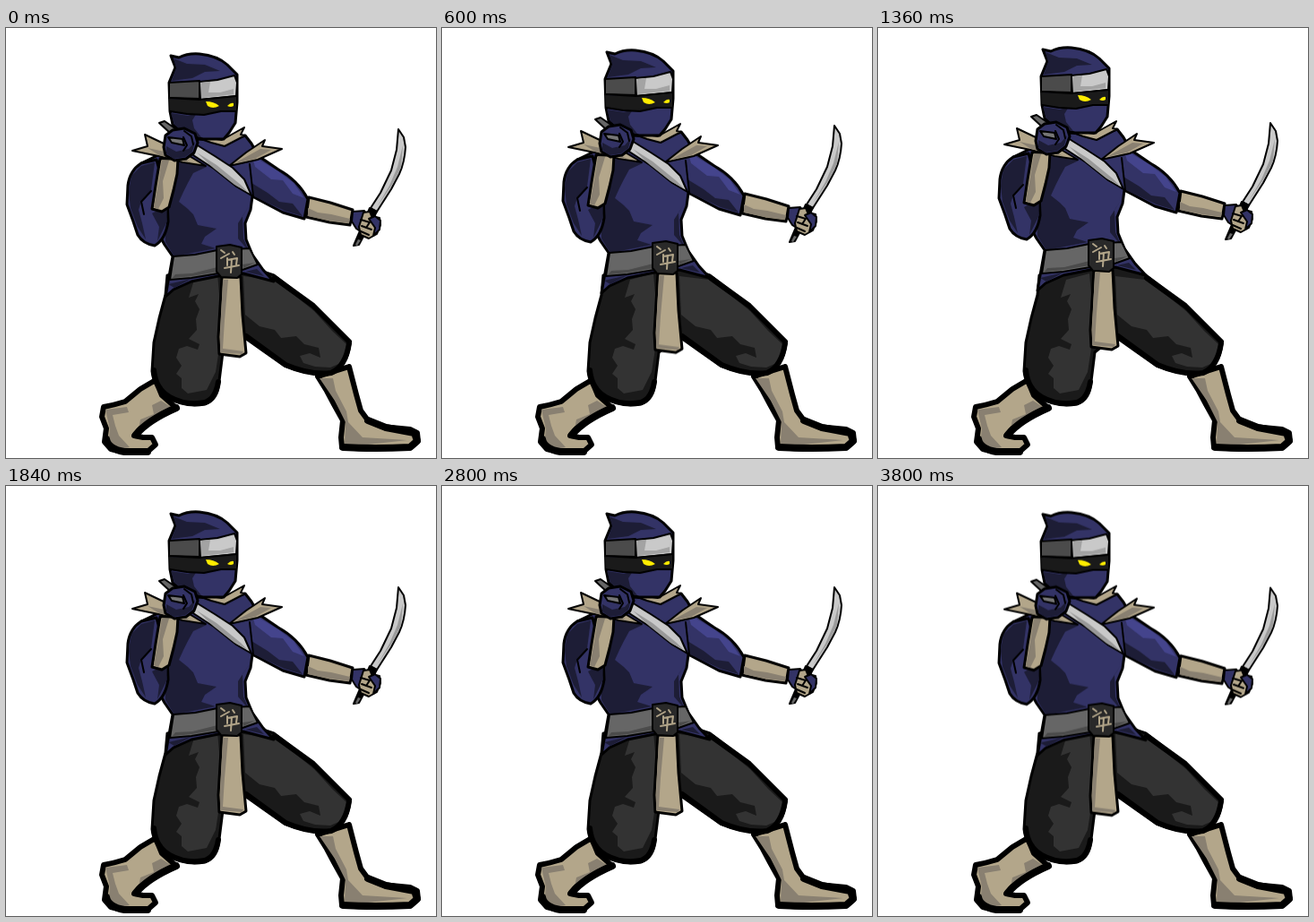
Recreate the animation shown at these times as an HTML page. Size 480 by 480 pixels, loop 3840 ms.

```html
<!DOCTYPE html>
<html lang="en">
<head>
<meta charset="utf-8">
<title>Ninja idle stance</title>
<style>
  html, body { margin: 0; width: 100%; height: 100%; overflow: hidden; background: #fff; }
  svg { display: block; width: 100vw; height: 100vh; }
  path { stroke-linejoin: round; stroke-linecap: round; }
  .ink { stroke: #000; stroke-width: 3; }
  .bold { stroke-width: 6; }
  .heavy { stroke-width: 8; }
  .thin { stroke-width: 2; }
  .line { fill: none; }
  .blue { fill: #333366; }
  .navy { fill: #1d1d36; }
  .glow { fill: #44448c; }
  .tan { fill: #b3a68a; }
  .dust { fill: #898071; }
  .cloth { fill: #333; }
  .coal { fill: #1a1a1a; }
  .steel { fill: #c9c9c9; }
  .iron { fill: #666; }
  .eye { fill: #ffed00; }

  /* Breathing: 11 ticks up, 13 ticks down, 40 ms each */
  .bob, .tail { animation: bob 960ms -40ms infinite; }
  .bob { --drop: 7.6px; }
  .tail { --drop: 1px; }
  @keyframes bob {
    0% { transform: translateY(var(--drop)); animation-timing-function: steps(11, end); }
    45.8333% { transform: translateY(0); animation-timing-function: steps(13, end); }
    100% { transform: translateY(var(--drop)); }
  }
</style>
</head>
<body>
<svg viewBox="0 0 480 480">
  <!-- Feet -->
  <g>
    <path class="tan ink bold" d="M167 393 L150 403 L133 417 Q120 421 109 423 L107 434 L112 447 L110 462 L117 470 Q140 476 158 473 L167 465 L163 457 L153 457 L143 455 L152 445 L163 436 L190 424 L174 410 Z"/>
    <path class="dust" d="M111 426 L135 423 L137 429 L119 432 L122 444 L126 455 L138 468 L128 470 L114 464 L116 448 Z M148 448 L150 437 L165 431 L163 421 L173 416 L184 423 L160 436 Z"/>
    <path class="ink line heavy" d="M112 459 Q114 470 132 473 L158 473 M145 454 Q158 438 190 424"/>
    <path class="tan ink bold" d="M348 389 L358 405 L366 420 L376 438 L374 457 L375 468 L403 470 L452 468 L460 461 L459 452 L451 448 L420 445 L404 438 L396 427 L391 409 L383 378 Z"/>
    <path class="dust" d="M350 391 L365 391 L368 405 L380 428 L382 440 L398 457 L448 460 L404 465 L378 465 L379 440 L367 416 Z"/>
    <path class="ink line heavy" d="M376 468 Q411 470 451 468 L459 461 L456 452 L424 446 L404 438"/>
  </g>

  <!-- Trousers -->
  <g>
    <path class="coal ink" d="M180 276 L178 298 L171 324 L165 351 L163 383 Q165 402 181 413 Q200 424 222 420 Q237 415 238 394 L242 362 L264 344 L288 361 L311 377 Q340 389 363 385 Q381 379 384 352 L365 333 L341 308 L299 276 L266 265 L238 268 Z"/>
    <path class="cloth" d="M210 281 L236 274 L240 320 L238 358 L234 384 L224 404 L203 408 L196 402 L196 391 L190 386 L196 377 L190 368 L193 358 L202 355 L214 359 L216 353 L204 347 L213 337 L212 325 L216 314 L211 305 L215 297 L204 301 Z"/>
    <path class="cloth" d="M265 277 L298 281 L323 299 L344 316 L364 338 L381 354 L376 373 L362 379 L345 378 L332 374 L328 366 L339 363 L351 368 L349 357 L333 353 L324 344 L307 346 L300 337 L283 333 L267 320 Z"/>
    <path class="ink line bold" d="M165 382 Q167 403 183 412 Q201 422 222 418 Q234 414 237 395 M383 352 Q379 378 363 385 Q340 388 312 376 L268 344 M300 279 L343 310 L383 350"/>
  </g>

  <g class="bob">
    <!-- Torso and far arm -->
    <path class="blue ink" d="M151 144 L176 132 L213 117 L249 119 L267 113 L274 122 L282 136 L304 151 Q326 163 337 184 L333 206 L309 199 L275 181 L273 196 L267 211 L268 229 L275 246 L287 263 L299 276 L265 267 L237 270 L207 276 L187 285 L178 293 L181 276 L186 248 L177 235 L172 226 L174 169 Z"/>
    <path class="navy" d="M176 170 L190 143 L224 148 L209 155 L203 166 L198 176 L193 187 L203 195 L209 201 L214 213 L235 217 L222 226 L218 234 L234 239 L188 248 L178 232 Z"/>
    <path class="navy" d="M274 166 L292 177 L305 187 L320 189 L331 203 L311 197 L277 181 Z M181 279 L207 273 L188 283 Z M267 265 L280 262 L288 270 Z M272 191 L264 203 L265 228 L271 242 L259 228 L259 211 Z"/>
    <path class="glow" d="M272 126 L284 141 L304 153 L321 166 L333 183 L320 178 L309 163 L296 162 L278 148 Z"/>
    <path class="ink line thin" d="M272 145 L276 181"/>

    <!-- Near arm -->
    <path class="blue ink" d="M168 140 L151 144 Q138 152 136 169 L135 190 L142 209 L147 224 Q153 234 166 236 Q178 229 181 209 L180 185 Z"/>
    <path class="navy" d="M166 143 L151 147 L140 158 L137 176 L139 194 L147 215 L156 229 L152 211 L148 196 L151 186 L162 174 Z M163 200 L180 191 L179 211 L169 231 L171 215 Z"/>
    <path class="ink line thin" d="M162 175 L151 187 L154 201"/>

    <!-- Collar -->
    <path class="tan ink thin" d="M141 130 L158 125 L155 112 L176 122 L203 135 L223 147 L197 143 L170 136 Z"/>
    <path class="dust" d="M158 127 L186 133 L207 143 L171 135 Z"/>
    <path class="tan ink thin" d="M249 147 L268 132 L289 118 L286 125 L308 128 L281 140 Z"/>
    <path class="dust" d="M255 144 L284 128 L296 129 L278 139 Z"/>
    <path class="tan ink thin" d="M204 112 L241 118 L266 104 L262 112 L267 113 L244 125 L229 121 Z"/>

    <!-- Head -->
    <path class="blue ink" d="M184 24 L193 26 Q203 21 216 22 Q236 24 247 34 L258 45 L258 76 L256 99 L249 110 L243 117 L220 117 L200 113 L186 101 L183 86 L182 54 L189 37 Z"/>
    <path class="navy" d="M187 27 L202 33 L222 34 L239 41 L222 42 L208 49 L185 52 L190 38 Z M184 88 L203 91 L213 88 L208 96 L210 105 L218 115 L200 111 L188 101 Z"/>
    <path class="ink thin" fill="#4b4b4b" d="M182 54 L216 52 L216 72 L182 71 Z"/>
    <path class="ink thin steel" d="M216 53 L236 51 L255 46 L258 54 L257 69 L238 71 L217 73 Z"/>
    <path fill="#a3a3a3" d="M218 54 L228 53 L226 65 L239 65 L254 61 L254 67 L236 69 L218 71 Z"/>
    <path class="coal" d="M182 72 L216 73 L257 69 L257 86 L240 86 L221 90 L202 89 L183 86 Z"/>
    <path class="ink line thin" d="M182 71 L216 73 L257 69 M183 86 L202 89 L221 90 L240 86 L257 86"/>
    <path class="eye" d="M223 75 Q232 75 238 80 Q231 84 225 80 Z M247 80 Q251 76 254 77 L254 80 Q251 82 247 80 Z"/>

    <!-- Forearm, fist and raised blade -->
    <path class="tan ink" d="M172 139 L192 139 L191 156 L187 174 L182 193 L174 198 L163 195 L167 169 Z"/>
    <path class="dust" d="M174 140 L182 141 L175 164 L176 183 L170 195 L165 193 L170 166 Z"/>
    <path class="iron ink thin" d="M171 99 L177 97 L190 106 L185 112 Z"/>
    <path class="steel ink thin" d="M212 123 L233 136 L253 149 L266 162 L274 180 L257 170 L232 150 L209 135 Z"/>
    <path fill="#999" d="M213 132 L235 146 L262 168 L270 176 L255 168 L231 149 Z"/>
    <path class="blue ink" d="M178 113 L186 107 L199 105 L211 111 L214 121 L210 132 L201 139 L188 141 L178 135 L176 126 Z"/>
    <path class="navy" d="M179 125 L190 131 L204 128 L211 120 L208 131 L200 137 L187 139 L179 133 Z"/>
    <path class="ink thin" fill="#777" d="M181 115 L197 117 L199 124 L185 121 Z"/>
    <path class="ink line thin" d="M199 108 L207 114 L209 123 M198 115 L202 124 L198 130"/>

    <!-- Extended forearm, hand and blade -->
    <path class="tan ink" d="M338 182 L362 188 L387 196 L384 213 L361 210 L335 204 Z"/>
    <path class="dust" d="M337 194 L348 199 L363 201 L384 206 L383 211 L361 208 L337 203 Z"/>
    <path class="steel ink thin" d="M407 194 L418 177 L430 152 L436 129 L438 106 L444 115 L446 126 Q445 143 439 156 L430 173 L414 198 Z"/>
    <path fill="#9b9b9b" d="M414 193 L428 169 L437 148 L443 124 L441 149 L431 168 Z"/>
    <path class="ink thin" d="M406 194 L414 198 L394 235 L388 236 Z"/>
    <path class="blue ink thin" d="M387 198 L400 197 L405 205 L397 221 L391 217 L386 209 Z"/>
    <path class="tan ink thin" d="M399 199 L406 198 L408 203 L417 205 L418 213 L414 223 L405 228 L396 224 L394 215 Z"/>
    <path class="blue ink thin" d="M405 206 L412 203 L418 208 L417 218 L410 225 L412 216 Z"/>
    <path class="ink line thin" d="M396 207 L406 210 L402 216 M397 214 L408 218 M396 220 L405 224"/>
    <path class="iron" d="M393 229 L396 230 L392 236 L390 235 Z"/>

    <!-- Belt -->
    <path class="iron ink thin" d="M187 248 L211 246 L236 241 L272 239 L281 257 L264 263 L237 267 L207 272 L183 274 Z"/>
    <path fill="#4b4b4b" d="M189 268 L208 267 L236 260 L236 265 L207 270 L186 272 Z M264 257 L278 255 L265 261 Z"/>
    <g class="tail">
      <path class="tan ink" d="M241 270 L262 270 L264 312 L268 355 L261 359 L238 356 L237 337 Z"/>
      <path class="dust" d="M242 273 L248 273 L244 318 L242 350 L265 353 L263 356 L239 354 L239 335 Z"/>
    </g>
    <path class="ink thin" fill="#292929" d="M235 237 L250 235 L263 238 L263 268 L258 272 L240 271 L235 265 Z"/>
    <path class="line" stroke="#b3a68a" stroke-width="2" d="M240 241 L244 244 M253 243 L255 246 M240 250 L249 245 M247 250 L247 258 M247 252 L258 250 L257 257 M244 261 L260 258 M252 251 L251 266"/>
  </g>
</svg>
</body>
</html>
```
